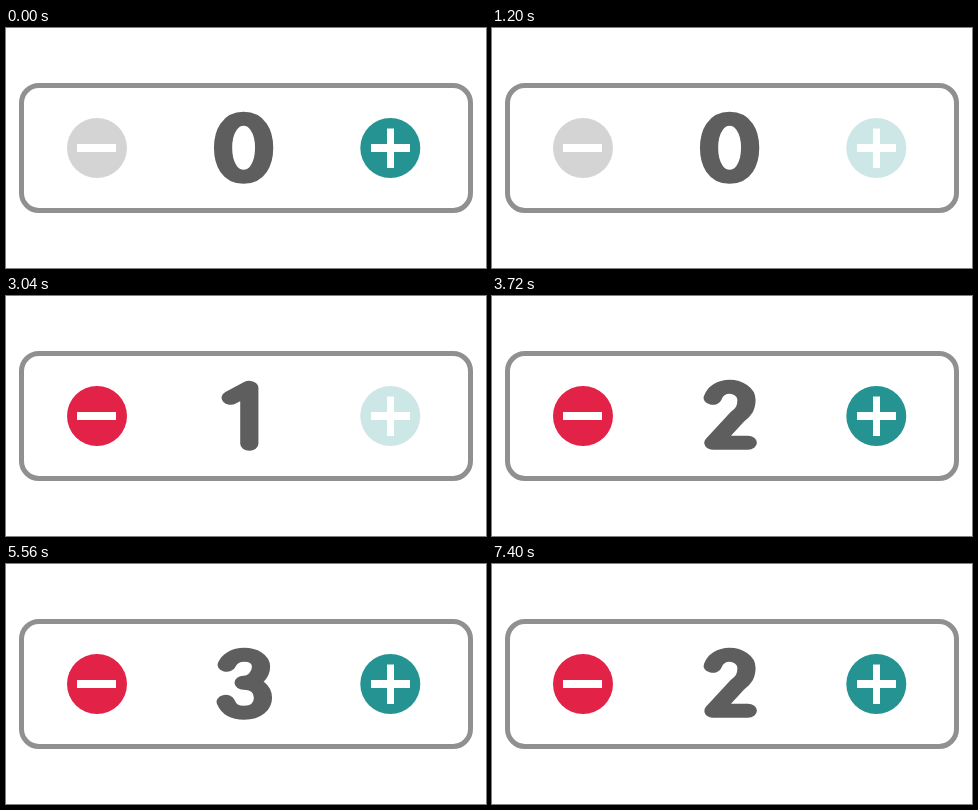
These frames come from a looping animation (480 by 240 pixels, 8 s). An HTML page:

```html
<!DOCTYPE html>
<html lang="en">
<head>
<meta charset="utf-8">
<title>Counter</title>
<style>
  html, body { margin: 0; width: 100%; height: 100%; overflow: hidden; background: #fff; }
  svg { display: block; width: 100%; height: 100%; }
  .digit { fill: none; stroke: #5e5e5e; stroke-width: 14; stroke-linecap: round; stroke-linejoin: round; }
</style>
</head>
<body>
<svg viewBox="0 0 480 240" role="img" aria-label="Counter with minus and plus buttons">
  <defs>
    <rect id="frame" x="15.5" y="57.5" width="449" height="125" rx="17.5" stroke="#909090" stroke-width="5"/>
  </defs>
  <use href="#frame" fill="#fff"/>
  <path id="digit" class="digit" transform="translate(237.6 119.8) scale(1.3 1)"/>
  <circle id="idle" cx="91" cy="120" r="30" fill="#d4d4d4"/>
  <use id="veil" href="#frame" fill="#fff" fill-opacity=".5" stroke-opacity=".5"/>
  <path id="next" class="digit" stroke-opacity=".5" transform="translate(237.6 119.8) scale(1.3 1)"/>
  <circle id="minus" cx="91" cy="120" r="30" fill="#e32248"/>
  <path d="M71 116h39v8h-39z" fill="#fff"/>
  <circle id="plus" cx="384.3" cy="120" r="30" fill="#249391"/>
  <path d="M365 116h39v8h-39zM381 100.4h7V140h-7z" fill="#fff"/>
</svg>
<script>
const LOOP = 8000, STEP = 40, ROUND = 1840;
const $ = id => document.getElementById(id);
const [digit, next, idle, veil, minus, plus] =
  ['digit', 'next', 'idle', 'veil', 'minus', 'plus'].map($);

// Centre lines; the wider x scale makes stems heavier than bars.
const glyphs = [
  'M0-29C10-29 15.8-17 15.8 0S10 29 0 29-15.8 17-15.8 0-10-29 0-29Z',
  'M-10-18L4.4-28V28',
  'M-13-18C-11-25-6-29 0-29S13-24 13-16 11-4 6 1L-12.5 27H14',
  'M-13-19C-11-25-6-29 .5-29S13.4-25 13.4-17 8-1 0-1C9-1 14.9 5 14.9 14S9 29 .5 29-11.5 25-13.8 18'
];

const clamp = x => Math.max(0, Math.min(1, x));

// One tap per round: fade out, stay empty briefly, fade back in.
const fade = phase => clamp((Math.abs(phase - 1125) - 35) / 175);

function draw(time) {
  const t = Math.floor(time % LOOP / STEP) * STEP;
  const round = Math.floor(t / ROUND), phase = t % ROUND;

  // Three taps count up, the fourth counts down, each landing a step into the next round.
  const count = Math.max(0, phase < STEP ? round - 1 : round);
  const value = count < 4 ? count : 2;
  const mixing = phase < STEP && (round === 1 || round === 2);
  const active = count > 0;

  digit.setAttribute('d', glyphs[value]);
  next.setAttribute('d', mixing ? glyphs[value + 1] : '');
  veil.setAttribute('opacity', mixing ? 1 : 0);
  idle.setAttribute('opacity', active ? 0 : 1);
  minus.setAttribute('opacity', round === 3 ? fade(phase) : active ? 1 : mixing ? 0.5 : 0);
  plus.setAttribute('opacity', round < 3 ? fade(phase) : 1);
}

const start = performance.now();
function tick() {
  draw(performance.now() - start);
  requestAnimationFrame(tick);
}
tick();
</script>
</body>
</html>
```
